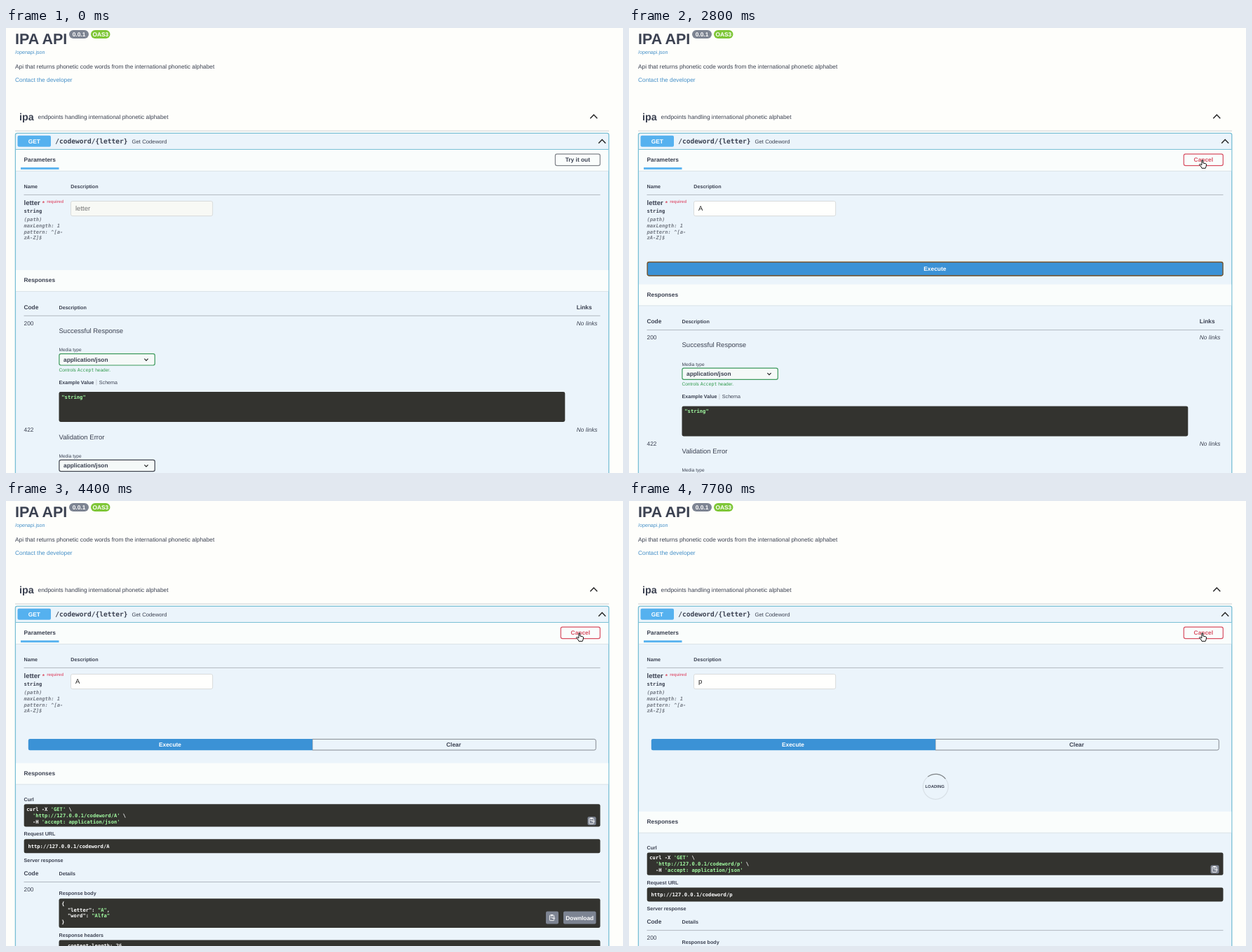
An HTML page with a canvas that plays this animation: 880 px wide and 636 px high, repeating every 8000 ms.

```html
<!DOCTYPE html>
<html lang="en">
<head>
<meta charset="utf-8">
<title>IPA API</title>
<style>
html, body { margin: 0; width: 100%; height: 100%; overflow: hidden; background: #fefefb; }
canvas { display: block; width: 880px; height: 636px; }
</style>
</head>
<body>
<canvas id="stage" width="880" height="636"></canvas>
<script>
const ctx = document.getElementById('stage').getContext('2d');
const LOOP = 8000;
const SANS = '"Liberation Sans", Arial, sans-serif';
const MONO = '"DejaVu Sans Mono", monospace';
const INK = '#3b4151', LINK = '#4590c8', GET = '#55b1ef', EXEC = '#3b92d6';
const EDGE = '#79bfd5', BODY = '#ebf4fb', HEAD = '#fafdfc', DARK = '#33332f';
const LIME = '#a2fca2', SLATE = '#7d8492', RED = '#d84f62', GREEN = '#2f9a4b';
// type sizes of the page
const XS = 5.96, S = 6.56, M = 7.15, L = 8.35, XL = 9.54;

function text(str, x, y, size, { color = INK, style = '', font = SANS, align = 'left' } = {}) {
  ctx.font = `${style} ${size}px ${font}`;
  ctx.fillStyle = color;
  ctx.textAlign = align;
  ctx.fillText(str, x, y);
  return x + ctx.measureText(str).width;
}
const bold = (str, x, y, size, opts = {}) => text(str, x, y, size, { style: 'bold', ...opts });
const code = (str, x, y, color = '#fff', size = M) => bold(str, x, y, size, { color, font: MONO });

// alternating white and green runs
function codeRuns(x, y, ...runs) {
  runs.forEach((run, i) => { x = code(run, x, y, i % 2 ? LIME : '#fff'); });
}

function box(x1, y1, x2, y2, { fill, stroke, width = 1.1, radius = 2.4 } = {}) {
  ctx.beginPath();
  ctx.roundRect(x1, y1, x2 - x1, y2 - y1, radius);
  if (fill) { ctx.fillStyle = fill; ctx.fill(); }
  if (stroke) { ctx.strokeStyle = stroke; ctx.lineWidth = width; ctx.stroke(); }
}

function rect(x1, y1, x2, y2, fill) {
  ctx.fillStyle = fill;
  ctx.fillRect(x1, y1, x2 - x1, y2 - y1);
}

const rule = (y, color = '#abb2ba') => rect(25.5, y - .4, 847.5, y + .5, color);

function chevron(x, y, w, h, width = 1.4) {
  ctx.beginPath();
  ctx.moveTo(x - w, y + h);
  ctx.lineTo(x, y - h);
  ctx.lineTo(x + w, y + h);
  ctx.strokeStyle = '#222';
  ctx.lineWidth = width;
  ctx.stroke();
}

function mix(a, b, k) {
  return `rgb(${a.map((v, i) => Math.round(v + (b[i] - v) * k)).join(',')})`;
}

function sectionHead(y, title) {
  rect(14, y, 859.2, y + 30, HEAD);
  rect(14, y + 30, 859.2, y + 31, '#dbe3e8');
  bold(title, 25.5, y + 17.4, L);
}

function drawHeader() {
  bold('IPA API', 13, 22.8, 21.46);
  box(90, 3, 118, 15, { fill: SLATE, radius: 6 });
  box(121, 3, 148.5, 15, { fill: '#7ec636', radius: 6 });
  bold('0.0.1', 104, 12.1, L, { color: '#fff', align: 'center' });
  bold('OAS3', 134.8, 12.1, L, { color: '#fff', align: 'center' });
  text('/openapi.json', 13, 36.8, M, { color: LINK });
  text('Api that returns phonetic code words from the international phonetic alphabet', 13, 57.7, L);
  text('Contact the developer', 13, 76.8, L, { color: LINK });
  bold('ipa', 19, 132, 14.3);
  text('endpoints handling international phonetic alphabet', 45.5, 130, L);
  chevron(838.3, 126.6, 5, 2.6);
  rect(13, 146.6, 860, 147.5, '#c6c9cd');
}

function drawOperation() {
  box(13.4, 150.4, 859.8, 660, { fill: BODY, stroke: EDGE, width: 1.3 });
  rect(14, 173, 859.2, 174, EDGE);
  box(16.5, 153.8, 64, 169.8, { fill: GET, radius: 2 });
  bold('GET', 40.3, 164.5, L, { color: '#fff', align: 'center' });
  code('/codeword/{letter}', 70.2, 165, INK, XL);
  text('Get Codeword', 179.5, 165, 7.75);
  chevron(850.2, 162.2, 5, 2.6);
  sectionHead(174, 'Parameters');
  rect(21, 199.3, 75.5, 202.2, GET);
  bold('Name', 25.5, 229.2, M);
  bold('Description', 92.3, 229.2, M);
  rule(238.3);
  bold('letter', 25.5, 253, XL);
  bold('*', 51.8, 253, L, { color: RED });
  bold('required', 58.2, 250, XS, { color: '#e0627c' });
  code('string', 25.5, 264, INK);
  ['(path)', 'maxLength: 1', 'pattern: ^[a-', 'zA-Z]$'].forEach((line, i) =>
    text(line, 25.5, 276.2 + i * 8.65, M, { color: '#767c86', style: 'italic bold', font: MONO }));
}

function drawTryButton(s) {
  const ink = mix([59, 65, 81], [216, 79, 98], s.redness);
  const edge = mix([128, 132, 138], [216, 79, 98], s.redness);
  const left = s.editing ? 791.3 : 783.4;
  box(left, 180.2, 847.3, 196.6, { stroke: edge, width: 1.2 });
  bold(s.editing ? 'Cancel' : 'Try it out', (left + 847.3) / 2, 191, L, { color: ink, align: 'center' });
}

function drawInput(s) {
  box(92.5, 247.5, 294.7, 268.6, { fill: s.editing ? '#fffffd' : '#f8f9f5', stroke: '#d6d9d9', width: .9 });
  if (s.selected) rect(99, 252, 105.5, 264, '#cbe4fa');
  if (s.value) text(s.value, 99, 261.2, XL, { color: '#222' });
  else text('letter', 99, 261.2, XL, { color: '#757575' });
  if (s.focused) box(92.8, 247.8, 294.3, 268.3, { stroke: '#101010', width: 1.8 });
  if (s.caret) rect(s.caret - .4, 252, s.caret + .5, 263, '#111');
}

function drawButtons(s) {
  if (!s.editing) return;
  const white = { color: '#fff', align: 'center' };
  const ring = { stroke: mix([229, 151, 60], [16, 16, 16], s.ring), width: .8 + s.ring };
  if (s.live) {
    box(437, 340.4, 841.3, 356, { stroke: '#858a91', width: 1, radius: [0, 2.4, 2.4, 0] });
    box(31.8, 340, 437, 356.3, { fill: EXEC, radius: [2.4, 0, 0, 2.4] });
    bold('Execute', 234, 351, L, white);
    bold('Clear', 638.5, 351, L, { align: 'center' });
    if (s.ring) box(32.3, 340.5, 436.4, 356, ring);
  } else {
    box(25.7, 334, 847.5, 354.5, { fill: EXEC });
    bold('Execute', 436.3, 346.7, L, white);
    if (s.ring) box(26.2, 334.5, 847, 354, ring);
  }
}

function drawSpinner(y, { turn, shade }) {
  ctx.lineWidth = 1.2;
  ctx.strokeStyle = 'rgba(85,85,85,.12)';
  ctx.beginPath();
  ctx.arc(437.3, y, 18, 0, Math.PI * 2);
  ctx.stroke();
  ctx.strokeStyle = `rgba(0,0,0,${shade})`;
  ctx.beginPath();
  ctx.arc(437.3, y, 18, turn - Math.PI * .75, turn - Math.PI * .25);
  ctx.stroke();
  bold('LOADING', 436.2, y + 1.7, XS, { align: 'center' });
}

function drawSelect(y, edge) {
  text('Media type', 75.5, y - 3.2, S);
  box(75.9, y + .2, 212.3, y + 16.5, { fill: '#f5f9f8', stroke: edge, width: 1.2 });
  bold('application/json', 82, y + 11.2, L);
  chevron(200, y + 8.5, 2.6, -1.3, 1.2);
}

function drawSchema(y) {
  bold('Code', 25.5, y + 56, L);
  bold('Description', 75.5, y + 55.6, M);
  bold('Links', 813.8, y + 56, L);
  rule(y + 65.2);
  [[79, '200', 'Successful Response'], [231, '422', 'Validation Error']].forEach(([dy, status, label]) => {
    text(status, 25.5, y + dy, L);
    text(label, 75.5, y + dy + 11, XL);
    text('No links', 813.8, y + dy, L, { style: 'italic' });
  });
  drawSelect(y + 119.5, '#3d9a5c');
  const base = y + 144.8;
  let x = text('Controls ', 75.5, base, S, { color: GREEN });
  x = text('Accept', x, base, S, { color: GREEN, font: MONO });
  text(' header.', x, base, S, { color: GREEN });
  bold('Example Value', 75.5, y + 163, M);
  rect(128.6, y + 156.5, 129.3, y + 164.5, '#b9bfc6');
  text('Schema', 132.8, y + 163, M);
  box(75.5, y + 174, 797.3, y + 217, { fill: DARK });
  code('"string"', 79.3, y + 183.8, LIME);
  drawSelect(y + 271.2, '#41444e');
}

function drawCopy(x, y, size) {
  box(x, y, x + size, y + size, { fill: SLATE, radius: 2 });
  const cx = x + size / 2, cy = y + size / 2;
  box(cx - 3.6, cy - 3.6, cx + 2.6, cy + 4, { stroke: '#fff', width: .9, radius: .8 });
  rect(cx - 2, cy - 4.6, cx + 1, cy - 2.6, '#fff');
  rect(cx - .6, cy + .2, cx + 4.2, cy + 1.1, '#fff');
  rect(cx - 2.4, cy - 1.2, cx + 1, cy - .5, '#fff');
}

function drawResult(y, letter, word) {
  const url = `http://127.0.0.1/codeword/${letter}`;
  bold('Curl', 25.5, y + 54.2, M);
  box(25.7, y + 58.6, 847.5, y + 91, { fill: DARK });
  codeRuns(29.3, y + 68.5, 'curl -X ', "'GET'", ' \\');
  codeRuns(29.3, y + 77.2, '  ', `'${url}'`, ' \\');
  codeRuns(29.3, y + 85.9, '  -H ', "'accept: application/json'");
  drawCopy(829.5, y + 76.6, 12);
  bold('Request URL', 25.5, y + 103.7, M);
  box(25.7, y + 108.6, 847.5, y + 128.7, { fill: DARK });
  code(url, 31.4, y + 121, '#fff');
  bold('Server response', 25.5, y + 141.5, M);
  bold('Code', 25.5, y + 160.4, L);
  bold('Details', 75.5, y + 160.2, M);
  rule(y + 169.8);
  text('200', 25.5, y + 183.5, L);
  bold('Response body', 75.5, y + 188.7, M);
  box(75.5, y + 193.6, 847.5, y + 235.5, { fill: DARK });
  const line = i => y + 203.4 + i * 8.65;
  codeRuns(79.3, line(0), '{');
  codeRuns(79.3, line(1), '  "letter": ', `"${letter}"`, ',');
  codeRuns(79.3, line(2), '  "word": ', `"${word}"`);
  codeRuns(79.3, line(3), '}');
  drawCopy(770, y + 212, 18);
  box(795, y + 212, 841.5, y + 230, { fill: SLATE, radius: 2 });
  bold('Download', 818.2, y + 224.2, L, { color: '#fff', align: 'center' });
  bold('Response headers', 75.5, y + 248.3, M);
  box(75.5, y + 253, 847.5, y + 290, { fill: DARK });
  code(' content-length: 26', 83.6, y + 263.5);
}

function outline(points) {
  ctx.beginPath();
  points.forEach(([x, y]) => ctx.lineTo(x, y));
  ctx.closePath();
  ctx.fillStyle = '#fff';
  ctx.strokeStyle = '#111';
  ctx.lineWidth = 1;
  ctx.lineJoin = 'round';
  ctx.fill();
  ctx.stroke();
}

function drawCursor({ x, y, hand }) {
  ctx.save();
  ctx.translate(x, y);
  outline(hand
    ? [[-1, 0], [.6, 0], [.8, 4], [4.6, 4.8], [5.6, 6], [5, 9.2], [4.2, 11.4], [-1, 11.4],
       [-2.2, 9], [-4.6, 6.4], [-3.8, 5.4], [-1.2, 7]]
    : [[.5, .5], [.5, 10], [2.8, 8], [4.4, 11.4], [5.8, 10.8], [4.4, 7.4], [7.6, 7.2]]);
  ctx.restore();
}

function cursorAt(t) {
  if (t < 400) return null;
  if (t < 600) return { x: 854.5, y: 198, hand: false };
  const k = Math.min(1, (t - 500) / 300);
  const ease = 1 - (1 - k) ** 2;
  return { x: 854.5 - 36.5 * ease, y: 198 - 9 * ease, hand: true };
}

// the screen is sampled ten times a second
function stateAt(time) {
  const t = Math.floor(time / 100) * 100;
  const within = (a, b) => t >= a && t < b;
  const ramp = (start, span) => Math.min(1, Math.max(0, (t - start) / span));
  const s = {
    editing: t >= 1100,
    redness: ramp(1000, 300),
    focused: within(1600, 2700) || within(5700, 7200),
    selected: within(5700, 6400),
    value: t < 2500 ? '' : t < 6400 ? 'A' : 'p',
    ring: within(2700, 3800) ? ramp(2600, 400) : within(7200, 7700) ? ramp(7100, 300) : 0,
    live: t >= 3900,
    letter: t >= 7700 ? 'p' : 'A',
    word: t >= 7700 ? 'Papa' : 'Alfa',
    cursor: cursorAt(t),
    caret: 0, spinner: null,
  };
  if (within(1600, 2200)) s.caret = 99.5;
  if (within(2500, 2700)) s.caret = 106;
  if (within(6400, 7000)) s.caret = 104.7;
  if (within(3800, 3900)) s.spinner = { turn: 0, shade: .58 };
  if (t >= 7700) s.spinner = { turn: .12, shade: .42 };
  s.responses = (s.live ? 374.6 : s.editing ? 366.4 : 346) + (s.spinner ? 69.2 : 0);
  return s;
}

function draw(time) {
  const s = stateAt(time);
  rect(0, 0, 880, 636, '#fefefb');
  drawHeader();
  drawOperation();
  drawTryButton(s);
  drawInput(s);
  drawButtons(s);
  if (s.spinner) drawSpinner(s.responses - 35.5, s.spinner);
  sectionHead(s.responses, 'Responses');
  if (s.live) drawResult(s.responses, s.letter, s.word);
  else drawSchema(s.responses);
  if (s.cursor) drawCursor(s.cursor);
}

ctx.textRendering = 'geometricPrecision';
const start = performance.now();
function tick() {
  draw((performance.now() - start) % LOOP);
  requestAnimationFrame(tick);
}
tick();
</script>
</body>
</html>
```
